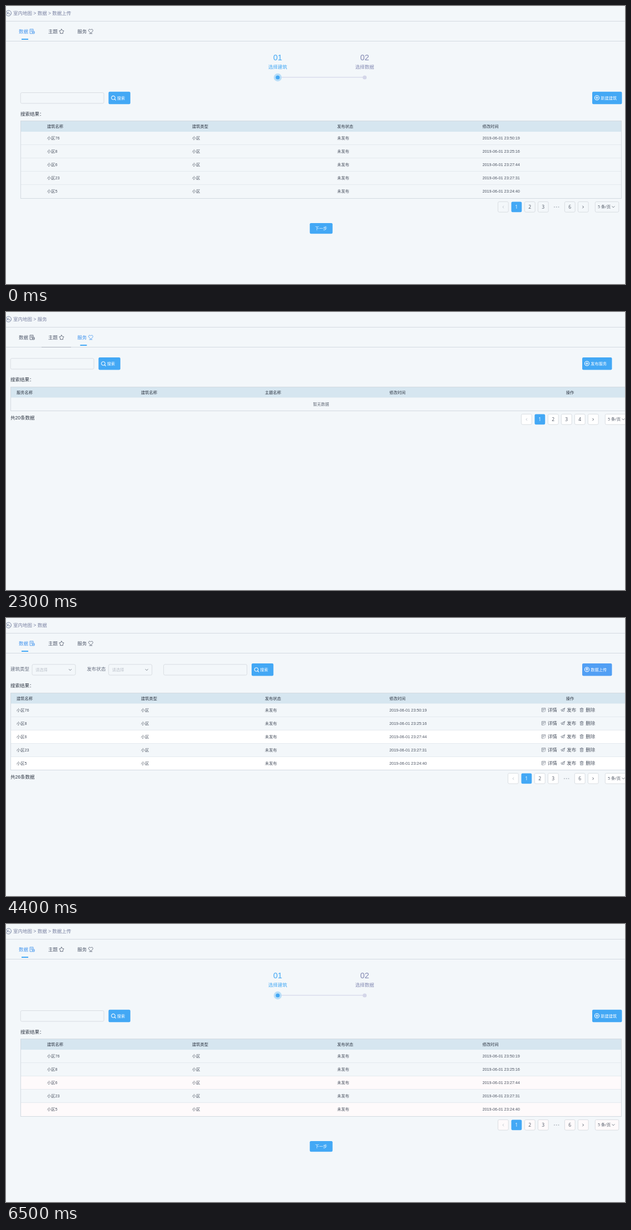
Animation of 1114 by 502 pixels, one loop 7600 ms. Source, as an HTML page with a canvas:

```html
<!DOCTYPE html>
<html lang="zh-CN">
<head>
<meta charset="utf-8">
<title>室内地图</title>
<style>
  html, body { margin: 0; width: 100%; height: 100%; overflow: hidden; background: #f3f7fa; }
  canvas { display: block; }
</style>
</head>
<body>
<canvas id="stage" width="1114" height="502"></canvas>
<script>
const ctx = document.getElementById('stage').getContext('2d');
const LOOP = 7600;
const SANS = '"Liberation Sans", "Noto Sans CJK SC", "Noto Sans CJK", sans-serif';
const UI = '"Open Sans", "Noto Sans CJK SC", "Noto Sans CJK", sans-serif';
const SMALL = 7.25, BASE = 8.5;
const C = {
  bg: '#f3f7fa', blue: '#43a8f5', hover: '#519ff4', active: '#3f93ee', text: '#4c5462',
  dark: '#2f3744', crumb: '#7b83a3', step: '#8288b2', line: '#d3dae1', box: '#d6dbe0',
  head: '#d6e6f0', row: '#e4eaef', pale: '#bcc2cb', tab: '#4e576a'
};

function text(s, x, y, size = SMALL, color = C.text, align = 'left', font = SANS) {
  ctx.font = `${size}px ${font}`;
  ctx.fillStyle = color;
  ctx.textAlign = align;
  ctx.fillText(s, x, y + size * 0.365);
}
function rect(x, y, w, h, color) {
  ctx.fillStyle = color;
  ctx.fillRect(x, y, w, h);
}
function box(x, y, w, h, fill, border) {
  ctx.beginPath();
  ctx.roundRect(x, y, w, h, 2.3);
  if (fill) { ctx.fillStyle = fill; ctx.fill(); }
  if (border) { ctx.strokeStyle = border; ctx.lineWidth = 0.9; ctx.stroke(); }
}
function dot(x, y, r, color) {
  ctx.beginPath();
  ctx.arc(x, y, r, 0, 7);
  ctx.fillStyle = color;
  ctx.fill();
}
function pen(path, x, y, color, width = 0.9) {
  ctx.save();
  ctx.translate(x, y);
  ctx.strokeStyle = color;
  ctx.lineWidth = width;
  ctx.lineCap = ctx.lineJoin = 'round';
  ctx.stroke(path);
  ctx.restore();
}

// Icon outlines, each centred on 0,0
const ring = r => `M${-r} 0A${r} ${r} 0 1 1 ${r} 0A${r} ${r} 0 1 1 ${-r} 0Z`;
const ICON = Object.fromEntries(Object.entries({
  back: ring(5) + 'M-.5 -2.3L-2.8 -.2L-.5 1.8M-2.5 -.2H.6Q2.6 0 2.7 2.3',
  data: 'M2 -1V-4H-4V4H0M-2.3 -1.8H.5M-2.3 .3H0M1 0H4V4H1ZM1 2H4',
  theme: 'M0 -4L1.4 -1.7L4.2 -.9L2.4 1.2L2.5 3.8H-2.5L-2.4 1.2L-4.2 -.9L-1.4 -1.7Z',
  service: 'M0 3L-3.6 -.6C-5 -3.5 -1.5 -5 0 -2.6C1.5 -5 5 -3.5 3.6 -.6ZM-2.5 4H2.5',
  search: ring(3.3) + 'M2.5 2.5L4.3 4.3',
  plus: ring(4) + 'M-2 0H2M0 -2V2',
  up: ring(4) + 'M0 2.2V-2M-1.6 -.5L0 -2.1L1.6 -.5',
  down: 'M-2.2 -1.1L0 1.1L2.2 -1.1',
  left: 'M1 -1.9L-.9 0L1 1.9',
  right: 'M-1 -1.9L.9 0L-1 1.9',
  detail: 'M3.2 0V-3.2H-3.2V3.2H0M-1.7 -1.2H1.7M-1.7 .6H.5M1.5 3.2L3.4 1.4',
  publish: 'M-3.6 .2L3.5 -3.2L1.8 3L-.6 1.2L3.5 -3.2M-.6 1.2L-1.6 3L-1.7 .7',
  edit: 'M1 -3.2H-3.2V3.2H3.2V0M-1 1L3.3 -3.2',
  trash: 'M-3 -2.2H3M-1.1 -2.2V-3.4H1.1V-2.2M-2.3 -2.2V3.4H2.3V-2.2M-.8 -.6V1.8M.8 -.6V1.8'
}).map(([name, d]) => [name, new Path2D(d)]));

const TABS = [
  { name: '数据', x: 23, icon: 'data' },
  { name: '主题', x: 76, icon: 'theme' },
  { name: '服务', x: 128.5, icon: 'service' }
];
const TIMES = ['23:50:19', '23:25:16', '23:27:44', '23:27:31', '23:24:40'].map(s => '2019-06-01 ' + s);
const BUILDINGS = ['小区76', '小区8', '小区6', '小区23', '小区5'];
const OPS = [['detail', '详情', 967.5], ['publish', '发布', 1002], ['trash', '删除', 1036]];
const buildingRows = BUILDINGS.map((name, i) => [name, '小区', '未发布', TIMES[i]]);

const PAGES = {
  upload: {
    tab: 0, crumb: '数据 > 数据上传', cols: [74, 335, 596, 857.5],
    heads: ['建筑名称', '建筑类型', '发布状态', '修改时间'],
    rows: buildingRows, pages: ['1', '2', '3', '…', '6'], add: '新建建筑'
  },
  theme: {
    tab: 1, crumb: '主题', cols: [19, 392], heads: ['主题名称', '修改时间'], opX: 940,
    rows: ['测试', '主题4', '主题3', '主题2', '主题1'].map((s, i) => [s, `2019-06-01 22:${32 - i * 3}:05`]),
    ops: [['edit', '编辑', 910], ['trash', '删除', 944.5]],
    total: 8, pages: ['1', '2'], add: '创建主题'
  },
  service: {
    tab: 2, crumb: '服务', cols: [19, 243, 466, 690], opX: 1015,
    heads: ['服务名称', '建筑名称', '主题名称', '修改时间'],
    rows: BUILDINGS.map((s, i) => ['服务' + (20 - i), s, '测试', TIMES[i]]),
    ops: OPS, total: 20, pages: ['1', '2', '3', '4'], add: '发布服务', keepTotal: true
  },
  data: {
    tab: 0, crumb: '数据', cols: [19, 243, 466, 690], opX: 1015,
    heads: ['建筑名称', '建筑类型', '发布状态', '修改时间'],
    rows: buildingRows, ops: OPS, total: 26, pages: ['1', '2', '3', '…', '6'], add: '数据上传'
  }
};

// start time, page, loaded, stripe colour, extras
const SCENES = [
  [0, 'upload', true, null],
  [1300, 'theme', false, null],
  [1500, 'theme', true, '#fff'],
  [2300, 'service', false, '#fff', { edge: 1 }],
  [2400, 'service', false, '#fff'],
  [2600, 'service', true, '#fff'],
  [3300, 'data', false, null, { edge: 2 }],
  [3400, 'data', true, '#fff'],
  [3500, 'data', true, '#fff', { hot: true }],
  [4900, 'upload', false, null],
  [5000, 'upload', true, '#fefafb']
];

function mix(a, b, k) {
  const at = (s, i) => parseInt(s.slice(i, i + 2), 16);
  return `rgb(${[1, 3, 5].map(i => Math.round(at(a, i) + (at(b, i) - at(a, i)) * k))})`;
}

function header(page, t, edge) {
  pen(ICON.back, 4.5, 13, '#707d9d');
  text('室内地图 > ' + page.crumb, 13, 13, BASE, C.crumb);
  rect(0, 27, 1114, 1, C.line);
  rect(0, 63, 1114, 1, C.line);
  const hover = t < 1300 ? Math.min(1, Math.max(0, (t - 500) / 400)) : 0;
  TABS.forEach((tab, i) => {
    const on = i === page.tab;
    const color = on ? C.active : i === 1 ? mix(C.tab, C.active, hover) : C.tab;
    text(tab.name, tab.x, 46, BASE, color);
    pen(ICON[tab.icon], tab.x + 24, 45.8, color, 0.8);
    if (on) rect(tab.x + 5, 59, 12, 2, C.blue);
    if (i === edge) rect(tab.x - 12, 63, 53, 1, '#adb3bd');
  });
  if (t >= 600 && t < 1100) {
    ctx.globalAlpha = Math.sin((t - 500) / 600 * Math.PI) * 0.7;
    rect(64, 63, 53, 1, '#adb3bd');
    ctx.globalAlpha = 1;
  }
}

function steps() {
  rect(496, 128, 146, 1.3, '#d6d8eb');
  dot(489, 129, 7.2, '#b9def8');
  dot(489, 129, 3.6, C.blue);
  dot(645.5, 129, 3.6, '#d4d6e9');
  [['01', '选择建筑', 489, C.blue], ['02', '选择数据', 645.5, C.step]].forEach(([n, s, x, color]) => {
    text(n, x, 92.5, 14.3, color, 'center');
    text(s, x, 109.5, BASE, color, 'center');
  });
}

function button(x, y, w, icon, label, color = C.blue) {
  box(x, y, w, 22.5, color);
  pen(ICON[icon], x + 8.5, y + 11, '#fff', 1.1);
  text(label, x + 15.3, y + 11.7, SMALL, '#fff');
}

function picker(x, y) {
  box(x, y, 78, 19.3, null, C.box);
  text('请选择', x + 6, y + 10, SMALL, C.pale);
  pen(ICON.down, x + 68.5, y + 9.8, '#6d7480');
}

function filters(page, dx, y, hot) {
  let x = dx;
  if (page === PAGES.data) {
    text('建筑类型', 8, y + 9, BASE, '#697182');
    picker(47, y + 0.5);
    text('发布状态', 145.5, y + 9, BASE, '#697182');
    picker(184.7, y + 0.5);
    x = 283.5;
  }
  box(x + 0.2, y + 0.5, 150, 19.3, null, C.box);
  button(x + 158.5, y - 1.3, 39.3, 'search', '搜索');
  button(dx + 1029, y - 1.3, 53.5, page === PAGES.data ? 'up' : 'plus', page.add, hot ? C.hover : C.blue);
  text('搜索结果：', dx, y + 39, BASE, C.dark);
}

function pager(labels, shift, y, fill) {
  const first = 1029 + shift - 24 * (labels.length + 1);
  const cell = (x, on) => box(x + 0.4, y + 0.4, 18.8, 18.8, on ? C.blue : fill, on ? null : C.box);
  cell(first);
  pen(ICON.left, first + 9.7, y + 10, C.pale);
  labels.forEach((s, i) => {
    const x = first + 24 * (i + 1);
    if (s === '…') {
      [-3.8, 0, 3.8].forEach(d => dot(x + 9.7 + d, y + 10, 1, '#b5bbc4'));
      return;
    }
    cell(x, i === 0);
    text(s, x + 9.7, y + 9.9, BASE, i ? C.text : '#fff', 'center', UI);
  });
  const next = 1029 + shift;
  cell(next);
  pen(ICON.right, next + 9.7, y + 10, labels.length > 1 ? C.text : C.pale);
  box(next + 31.3, y + 0.4, 42.5, 18.8, fill, C.box);
  text('5 条/页', next + 36, y + 9.8, SMALL, C.text, 'left', UI);
  pen(ICON.down, next + 64, y + 9.8, '#6d7480');
}

function table(page, left, top, loaded, stripe) {
  const width = page === PAGES.upload ? 1082 : 1118;
  const body = top + 19.5, count = loaded ? page.rows.length : 1, bottom = body + 24 * count;
  if (loaded && stripe) [2, 4].forEach(i => rect(left, body + 24 * i, width, 24, stripe));
  rect(left, top, width, 19.5, C.head);
  page.heads.forEach((s, i) => text(s, page.cols[i], top + 10, SMALL, C.dark));
  if (page.opX) text('操作', page.opX, top + 10, SMALL, C.dark, 'center');
  if (!loaded) text('暂无数据', 567, top + 31, SMALL, '#626a77', 'center');
  else page.rows.forEach((row, i) => {
    const y = top + 31.2 + 24 * i;
    row.forEach((s, j) => text(s, page.cols[j], y, SMALL));
    (page.ops || []).forEach(([icon, s, x]) => {
      pen(ICON[icon], x, y - 0.2, '#5f6878', 0.7);
      text(s, x + 7.2, y, BASE);
    });
    if (i) rect(left, Math.round(body + 24 * i) - 1, width, 1, C.row);
  });
  ctx.strokeStyle = C.line;
  ctx.lineWidth = 1;
  ctx.strokeRect(left + 0.5, Math.floor(top) + 0.5, width - 1, Math.floor(bottom) - Math.floor(top));
  return bottom;
}

function draw(t) {
  const [, name, loaded, stripe, extra = {}] = SCENES.filter(s => s[0] <= t).pop();
  const page = PAGES[name], upload = name === 'upload';
  const left = upload ? 26 : 8, y = upload ? 156 : 83.3;
  rect(0, 0, 1114, 502, C.bg);
  header(page, t, extra.edge);
  if (upload) steps();
  filters(page, left, y, extra.hot);
  const bottom = table(page, left, upload ? 207.5 : 135, loaded, stripe);
  const full = loaded || page.keepTotal;
  if (!upload) text(`共${full ? page.total : 0}条数据`, 8, bottom + 12.3, BASE, C.dark);
  pager(full ? page.pages : ['1'], upload ? 0 : 18, Math.floor(bottom + 6.3), stripe);
  if (upload) {
    box(546.7, bottom + 45, 41, 19.3, C.blue);
    text('下一步', 567.2, bottom + 54.8, SMALL, '#fff', 'center');
  }
}

const start = performance.now();
function tick() {
  draw((performance.now() - start) % LOOP);
  requestAnimationFrame(tick);
}
tick();
</script>
</body>
</html>
```
